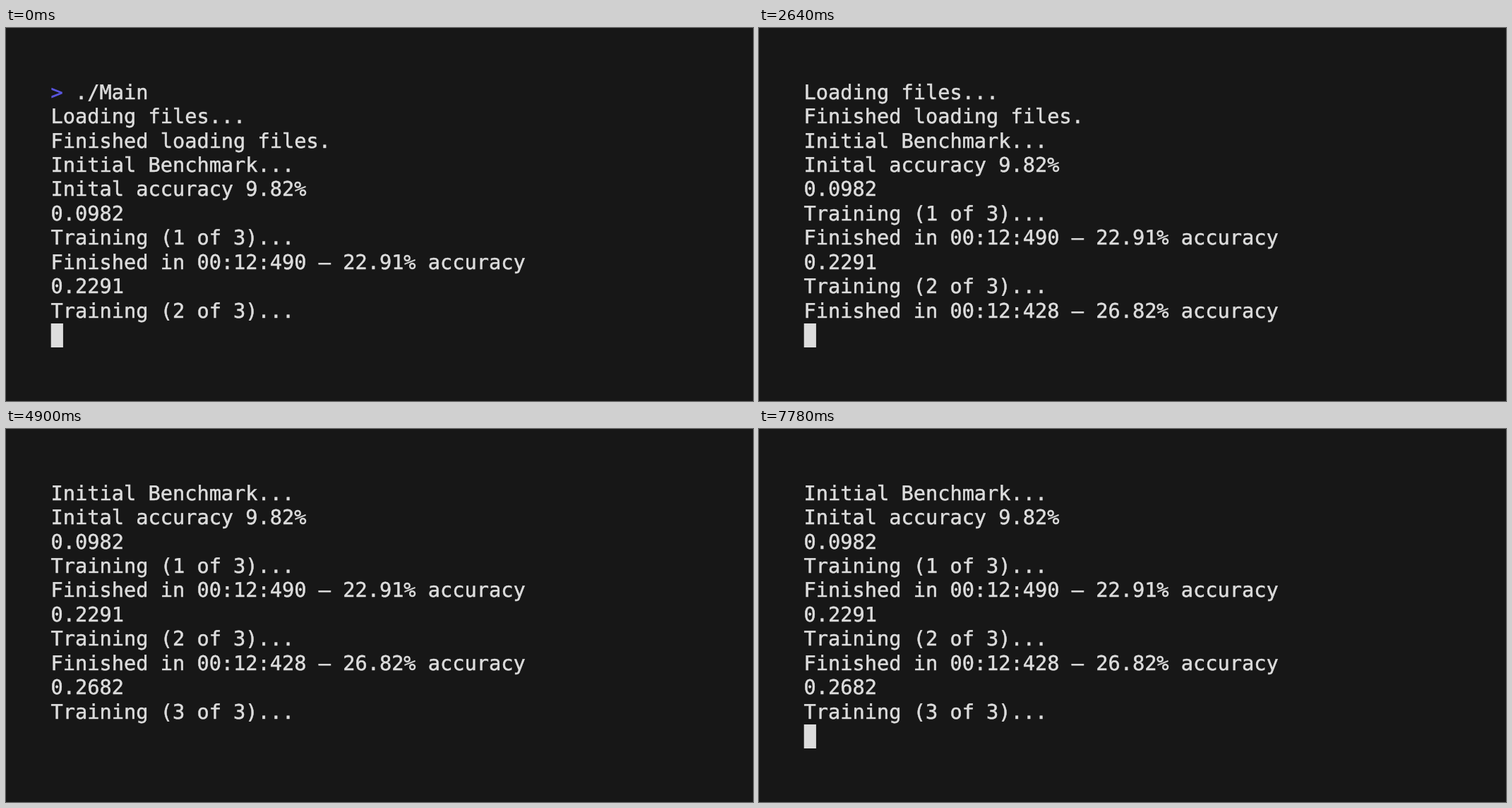
Animation of 1058x529 px, one loop 8 s. Source, as an HTML page:

```html
<!DOCTYPE html>
<html lang="en">
<head>
<meta charset="utf-8">
<title>Training log</title>
<style>
  html, body { margin: 0; width: 100%; height: 100%; overflow: hidden; background: #171717; }
  svg { display: block; width: 100vw; height: 100vh; }
  text {
    font: 28.63px "DejaVu Sans Mono", monospace;
    fill: #ddd; stroke: #ddd; stroke-width: .5px;
    white-space: pre; text-rendering: geometricPrecision;
  }
  .prompt { fill: #5a56e0; stroke: #5a56e0; }
</style>
</head>
<body>
<svg viewBox="0 0 1058 529">
  <rect width="1058" height="529" fill="#171717"/>
  <g id="rows"></g>
  <rect id="cursor" x="63.7" y="419" width="17.2" height="34" fill="#ddd"/>
</svg>
<script>
const NS = "http://www.w3.org/2000/svg";
const LOOP = 8000, ROWS = 10, LEFT = 63.6, BASE = 100.7, PITCH = 34.44;

const log = [
  "> ./Main",
  "Loading files...",
  "Finished loading files.",
  "Initial Benchmark...",
  "Inital accuracy 9.82%",
  "0.0982",
  "Training (1 of 3)...",
  "Finished in 00:12:490 – 22.91% accuracy",
  "0.2291",
  "Training (2 of 3)...",
  "Finished in 00:12:428 – 26.82% accuracy",
  "0.2682",
  "Training (3 of 3)..."
];

// Each output burst scrolls the log; the cursor toggles at every blink time.
const scrolls = [[0, 0], [2640, 1], [3140, 3]];
const blinks = [520, 1080, 1660, 2240, 3740, 4320, 4900, 5480, 6040, 6620, 7200, 7780];

const rows = document.getElementById("rows");
const cursor = document.getElementById("cursor");

function add(parent, tag, attrs, content = "") {
  const el = document.createElementNS(NS, tag);
  for (const key in attrs) el.setAttribute(key, attrs[key]);
  el.textContent = content;
  return parent.appendChild(el);
}

function drawRow(line, i) {
  const row = add(rows, "text", { x: LEFT, y: BASE + i * PITCH });
  const isPrompt = line.startsWith(">");
  if (isPrompt) add(row, "tspan", { class: "prompt" }, ">");
  row.append(isPrompt ? line.slice(1) : line);
}

let shown = -1;
function render(time) {
  const t = time % LOOP;
  const first = scrolls.filter(([at]) => at <= t).pop()[1];
  if (first !== shown) {
    shown = first;
    rows.replaceChildren();
    log.slice(first, first + ROWS).forEach(drawRow);
  }
  const flips = blinks.filter(at => at <= t).length;
  cursor.setAttribute("visibility", flips % 2 ? "hidden" : "visible");
}

const start = performance.now();
function tick() {
  render(performance.now() - start);
  requestAnimationFrame(tick);
}
tick();
</script>
</body>
</html>
```
